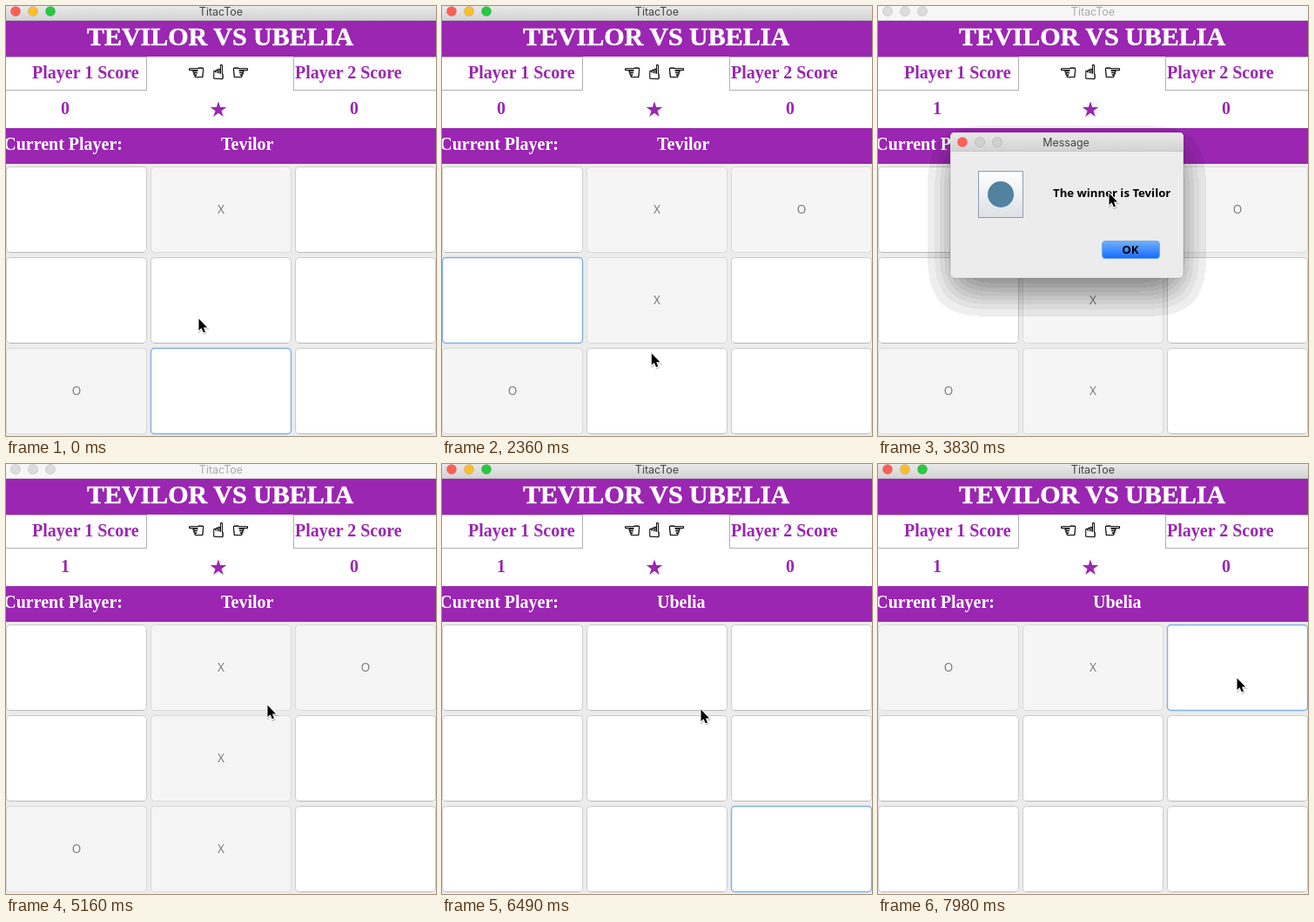
An HTML page that plays this animation: 494x493 px, repeating every 8 s.

```html
<!DOCTYPE html>
<html lang="en">
<head>
<meta charset="utf-8">
<title>TitacToe</title>
<style>
  html, body { margin: 0; width: 100%; height: 100%; overflow: hidden; background: #ececec; }
  svg { display: block; }
  text { white-space: pre; }
  .serif { font: bold 20px "Liberation Serif", Times, serif; }
  .title { font: bold 30px "Liberation Serif", Times, serif; stroke: #fff; stroke-width: .5; }
  .ui { font: 600 13.2px "Noto Sans", "Open Sans", sans-serif; }
  .cell { font: 13.5px "Noto Sans", "Open Sans", sans-serif; }
  .bar { font: 12.5px Inter, Roboto, sans-serif; }
  .hand { font: 23px "DejaVu Sans", sans-serif; stroke: #000; stroke-width: .6; }
</style>
</head>
<body>
<svg id="stage" width="494" height="493" viewBox="0 0 494 493"></svg>
<script>
const LOOP = 8000, STEP = 147, PURPLE = '#9a26b1';
const P1 = 'Tevilor', P2 = 'Ubelia';
const stage = document.getElementById('stage');

// Cursor glides: start time, number of steps, destination.
const glides = [
  [0, 1, 221, 357],
  [600, 3, 386, 245],
  [1490, 7, 216, 422],
  [2950, 6, 225, 235],
  [3830, 1, 265, 213],
  [3980, 2, 298, 262],
  [4270, 2, 300, 275],
  [5750, 3, 297, 280],
  [6790, 3, 121, 237],
  [7390, 3, 247, 240],
  [7830, 1, 265, 243],
  [7980, 1, 412, 244],
];

// Each event overrides part of the state from its time on.
const events = [
  [0, { board: ' X    O  ', focus: 7, player: P1, score: 0, dialog: '', active: true, pressed: false }],
  [150, { focus: 4 }],
  [300, { board: ' X  X O  ', focus: 5, player: P2 }],
  [1040, { focus: 2 }],
  [1190, { board: ' XO X O  ', focus: 3, player: P1 }],
  [2510, { focus: 7 }],
  [2650, { board: ' XO X OX ', focus: -1, dialog: 'win', active: false }],
  [2800, { score: 1 }],
  [5010, { pressed: true }],
  [5160, { dialog: '', pressed: false }],
  [5310, { dialog: 'again' }],
  [6190, { pressed: true }],
  [6490, { board: ' '.repeat(9), focus: 8, player: P2, dialog: '', active: true, pressed: false }],
  [7240, { focus: 0 }],
  [7390, { board: 'O        ', focus: 1, player: P1 }],
  [7830, { board: 'OX       ', focus: 2, player: P2 }],
];

const rect = (x, y, w, h, fill, extra = '') =>
  `<rect x="${x}" y="${y}" width="${w}" height="${h}" fill="${fill}" ${extra}/>`;
const text = (str, x, y, cls, fill, anchor = 'middle') =>
  `<text x="${x}" y="${y}" class="${cls}" fill="${fill}" text-anchor="${anchor}">${str}</text>`;
const gradient = (id, top, bottom) =>
  `<linearGradient id="${id}" x2="0" y2="1"><stop stop-color="${top}"/><stop offset="1" stop-color="${bottom}"/></linearGradient>`;

// The dialog shadow falls off in visible bands.
const bands = Array.from({ length: 11 }, (_, i) => i && (i + 0.5) / 11);
const defs = '<defs>' +
  gradient('titleBar', '#e9e9e9', '#d2d2d2') +
  gradient('blue', '#70b0fb', '#166aff') +
  gradient('blueDown', '#4f95f6', '#0b56e2') +
  gradient('tile', '#ffffff', '#dde1e5') +
  `<filter id="shadow" x="-50%" y="-50%" width="200%" height="200%"><feGaussianBlur stdDeviation="20"/>
    <feComponentTransfer><feFuncA type="discrete" tableValues="${bands.join(' ')}"/></feComponentTransfer></filter></defs>`;

function lights(x, y, colors) {
  return colors.map((c, i) =>
    `<circle cx="${x + 20 * i}" cy="${y}" r="5.6" fill="${c}" stroke="#000" stroke-opacity=".1"/>`).join('');
}

function star(cx, cy, r) {
  const points = Array.from({ length: 10 }, (_, i) => {
    const a = i * Math.PI / 5, d = i % 2 ? r * 0.382 : r;
    return [cx + d * Math.sin(a), cy - d * Math.cos(a)];
  });
  return `<polygon points="${points.join(' ')}" fill="${PURPLE}"/>`;
}

function header({ active, score, player }) {
  const title = `${P1} VS ${P2}`.toUpperCase();
  return rect(0, 0, 494, 17, active ? 'url(#titleBar)' : '#f6f6f6') +
    rect(0, 16, 494, 1, active ? '#bdbdbd' : '#d6d6d6') +
    lights(11, 6, active ? ['#ff5f57', '#ffbd2e', '#28c940'] : Array(3).fill('#dcdcdc')) +
    text('TitacToe', 247, 11, 'bar', active ? '#444' : '#aaa') +
    rect(0, 17, 494, 41, PURPLE) +
    text(title, 246, 45, 'title', '#fff') +
    rect(0, 58, 494, 82, '#fff') +
    rect(-2.5, 58.5, 164, 38, '#fff', 'stroke="#b0b0b0"') +
    rect(330.5, 58.5, 166, 38, '#fff', 'stroke="#b0b0b0"') +
    text('Player 1 Score', 30, 83, 'serif', PURPLE, 'start') +
    text('Player 2 Score', 332, 83, 'serif', PURPLE, 'start') +
    [...'☜☝☞'].map((h, i) => text(h + '\uFE0E', 218.5 + 25.5 * i, 83.5, 'hand', '#000')).join('') +
    text(score, 68, 124, 'serif', PURPLE) +
    text(0, 400, 124, 'serif', PURPLE) +
    star(244, 119, 9.8) +
    rect(0, 140, 494, 41, PURPLE) +
    text('Current Player:', 134, 165, 'serif', '#fff', 'end') +
    text(player, 247, 165, 'serif', '#fff', 'start');
}

function cell(mark, i, focus) {
  const x = 166 * (i % 3), y = 184 + 104 * Math.floor(i / 3), used = mark !== ' ';
  const stroke = i === focus ? '#7fb0e8' : used ? '#dadada' : '#cbcbcb';
  return rect(x + 0.5, y + 0.5, 161, 98, used ? '#f5f5f5' : '#fff',
      `rx="4" stroke="${stroke}" stroke-width="${i === focus ? 1.4 : 1}"`) +
    (used || i === focus ? '' : rect(x + 4, y + 98, 154, 1, '#b9b9b9')) +
    text(mark, x + 81, y + 54, 'cell', '#7d7d7d');
}

function button(label, x, fill, stroke) {
  return rect(x + 0.5, 269.5, 66, 20, fill, `rx="3.5" stroke="${stroke}"`) +
    text(label, x + 33, 284, 'ui', '#000');
}

function dialog({ dialog: kind, pressed }) {
  if (!kind) return '';
  const win = kind === 'win', x = win ? 83 : 86, w = win ? 268 : 262;
  const blue = pressed ? 'url(#blueDown)' : 'url(#blue)', rim = '#6fa8f6';
  return rect(x, 163, w, 167, '#000', 'rx="5" opacity=".5" filter="url(#shadow)"') +
    rect(x, 145, w, 167, '#ececec', 'rx="5" stroke="#000" stroke-opacity=".15"') +
    `<path d="M${x} 167v-17q0-5 5-5h${w - 10}q5 0 5 5v17z" fill="url(#titleBar)"/>` +
    rect(x, 166, w, 1, '#c8c8c8') +
    lights(x + 14, 156, ['#ff5f57', '#d0d0d0', '#d0d0d0']) +
    text(win ? 'Message' : 'Yes or No', 216, 161, 'bar', '#444') +
    rect(x + 32.5, 189.5, 51, 53, 'url(#tile)', 'stroke="#8b9cb0"') +
    `<circle cx="${x + 58}" cy="216" r="15" fill="#5382a1"/>` +
    text(win ? `The winner is ${P1}` : 'Play Again?', x + 118, 219, 'ui', '#000', 'start') +
    (win ? button('OK', 257, blue, rim)
         : button('No', 171, '#fff', '#c9c9c9') + button('Yes', 254, blue, rim));
}

function cursorAt(t) {
  let x = 221, y = 357;
  for (const [start, steps, toX, toY] of glides) {
    if (t < start) break;
    const k = Math.min(1, (Math.floor((t - start) / STEP) + 1) / steps);
    x += (toX - x) * k;
    y += (toY - y) * k;
  }
  return [x, y];
}

function cursor([x, y]) {
  const shape = 'd="M0 0V13.4L3 10.7 5.3 15.8 7.5 14.9 5.4 10H9.6Z"';
  return `<g transform="translate(${x + 0.5} ${y + 1.5})">
    <path ${shape} transform="translate(.5 1.5)" opacity=".2" stroke="#000" stroke-width="2"/>
    <path ${shape} stroke="#fff" stroke-width="2" paint-order="stroke"/></g>`;
}

function draw(t) {
  const state = Object.assign({}, ...events.filter(([at]) => t >= at).map(e => e[1]));
  return defs + rect(0, 0, 494, 493, '#ececec') + header(state) +
    [...state.board].map((m, i) => cell(m, i, state.focus)).join('') +
    dialog(state) + cursor(cursorAt(t));
}

let shown = '';
function tick() {
  const next = draw(performance.now() % LOOP);
  if (next !== shown) stage.innerHTML = shown = next;
  requestAnimationFrame(tick);
}
tick();
</script>
</body>
</html>
```
